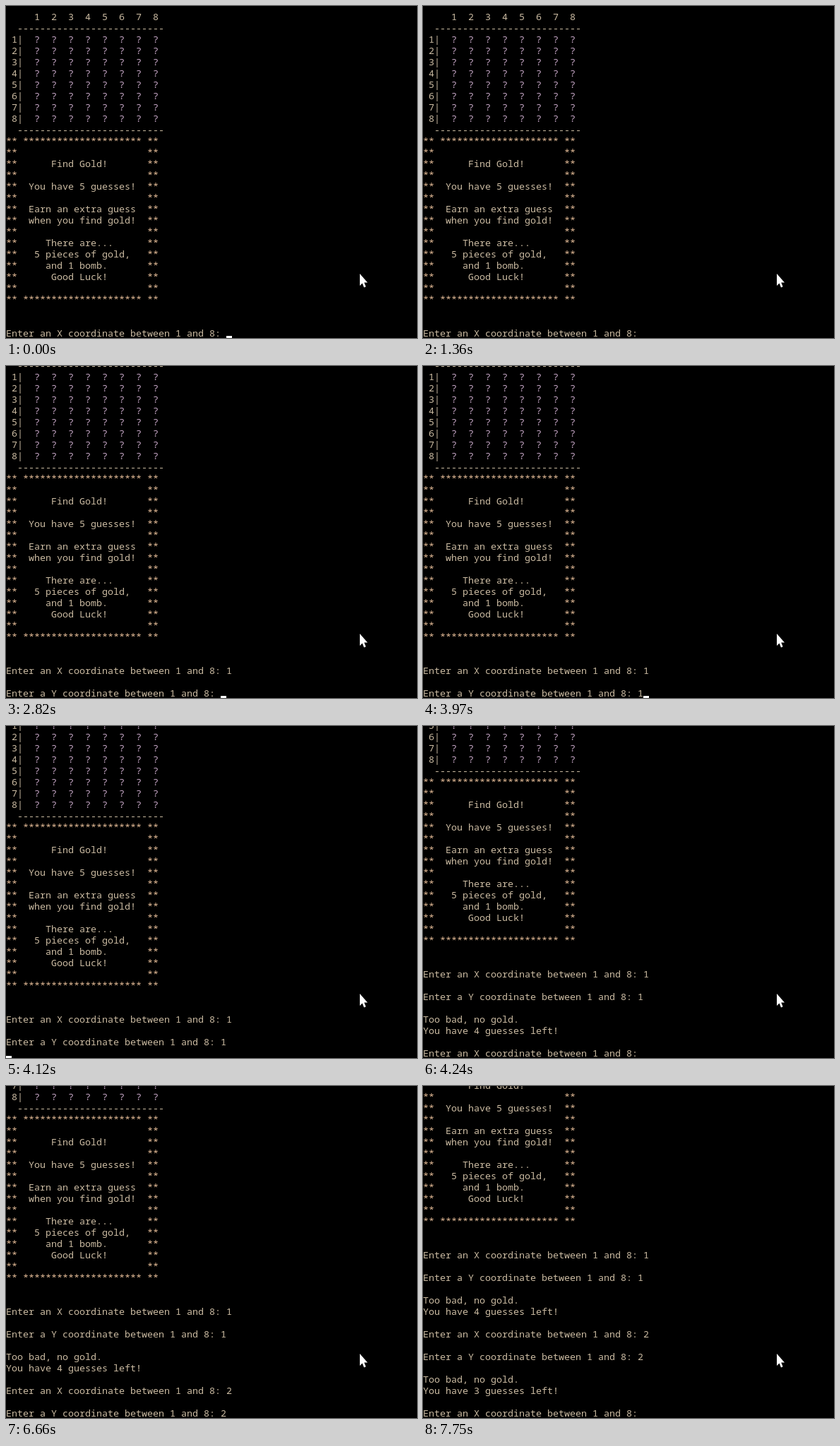
Write an HTML page that moves like this. It is 582x470 px and loops after 8000 ms.

```html
<!DOCTYPE html>
<html lang="en">
<head>
<meta charset="utf-8">
<title>Find Gold</title>
<style>
  html, body { margin: 0; width: 100%; height: 100%; overflow: hidden; background: #000; }
  svg { display: block; width: 582px; height: 470px; }
  text { font: 13.333px "Noto Sans Mono", "DejaVu Sans Mono", monospace; white-space: pre; fill: #cbbba2; }
  .mark { fill: #c9a9c9; }
  .star { fill: #e6bd98; }
</style>
</head>
<body>
<svg viewBox="0 0 582 470">
  <rect width="582" height="470"/>
  <g id="screen"></g>
  <rect id="caret" y="467" width="8" height="3" fill="#fff"/>
  <path d="M501 379V396L504.6 392.6L507 398.4L509.6 397.3L507.2 391.6H512Z" fill="#fff"/>
  <circle id="busy" cx="515" cy="379" r="5.2" fill="none" stroke="#3fa9e0" stroke-width="2.6"/>
</svg>
<script>
const LOOP = 8000, CELL = 8, ROW = 16, OFF = -1;
const NS = "http://www.w3.org/2000/svg";
const $ = id => document.getElementById(id);

const boxed = (indent = 0, words = "") =>
  "**" + (" ".repeat(indent - 2 > 0 ? indent - 2 : 0) + words).padEnd(23) + "**";
const rule = "  " + "-".repeat(26);
const border = "** " + "*".repeat(21) + " **";
const askX = "Enter an X coordinate between 1 and 8: ";
const askY = "Enter a Y coordinate between 1 and 8: ";
const numbers = [1, 2, 3, 4, 5, 6, 7, 8];
const miss = left => ["", "Too bad, no gold.", `You have ${left} guesses left!`, ""];

const lines = [
  "     " + numbers.join("  "),
  rule,
  ...numbers.map(n => ` ${n}|` + "  ?".repeat(8)),
  rule,
  border,
  boxed(),
  boxed(8, "Find Gold!"),
  boxed(),
  boxed(4, "You have 5 guesses!"),
  boxed(),
  boxed(4, "Earn an extra guess"),
  boxed(4, "when you find gold!"),
  boxed(),
  boxed(7, "There are..."),
  boxed(5, "5 pieces of gold,"),
  boxed(7, "and 1 bomb."),
  boxed(8, "Good Luck!"),
  boxed(),
  border,
  "", "",
  askX, "", askY, ...miss(4),
  askX, "", askY, ...miss(3),
  askX
];

// [time, value] steps
const scroll = [[0, 0], [2820, 2], [4120, 3], [4240, 7], [5850, 9], [7190, 14]];
const caretCol = [
  [0, 39], [430, OFF], [930, 39], [1360, OFF], [1920, 40], [2420, OFF],
  [2820, 38], [3380, 39], [3530, OFF], [3970, 39], [4120, 0], [4240, OFF],
  [5050, 39], [5450, 40], [5570, OFF], [5850, 38], [6660, OFF],
  [7190, 39], [7750, OFF]
];
// [time, row, column, key]
const keys = [[1920, 28, 39, "1"], [3380, 30, 38, "1"], [5450, 35, 39, "2"], [6660, 37, 38, "2"]];

function write(row, col, words) {
  const el = document.createElementNS(NS, "text");
  el.setAttribute("x", col * CELL);
  el.setAttribute("y", 20 + row * ROW);
  for (const part of words.split(/([?*]+)/).filter(Boolean)) {
    const span = document.createElementNS(NS, "tspan");
    if (part[0] === "?") span.setAttribute("class", "mark");
    if (part[0] === "*") span.setAttribute("class", "star");
    span.textContent = part;
    el.append(span);
  }
  $("screen").append(el);
  return el;
}

lines.forEach((words, row) => write(row, 0, words));
const typed = keys.map(([time, row, col, key]) => ({ time, el: write(row, col, key) }));

const valueAt = (steps, t) => steps.filter(([time]) => time <= t).pop()[1];
const show = (el, on) => el.setAttribute("visibility", on ? "visible" : "hidden");

function draw(t) {
  const col = valueAt(caretCol, t);
  $("screen").setAttribute("transform", `translate(0 ${-ROW * valueAt(scroll, t)})`);
  $("caret").setAttribute("x", col * CELL);
  show($("caret"), col !== OFF);
  show($("busy"), t >= 930 && t < 1050);
  for (const { time, el } of typed) show(el, t >= time);
}

const start = performance.now();
function tick() {
  draw((performance.now() - start) % LOOP);
  requestAnimationFrame(tick);
}
tick();
</script>
</body>
</html>
```
